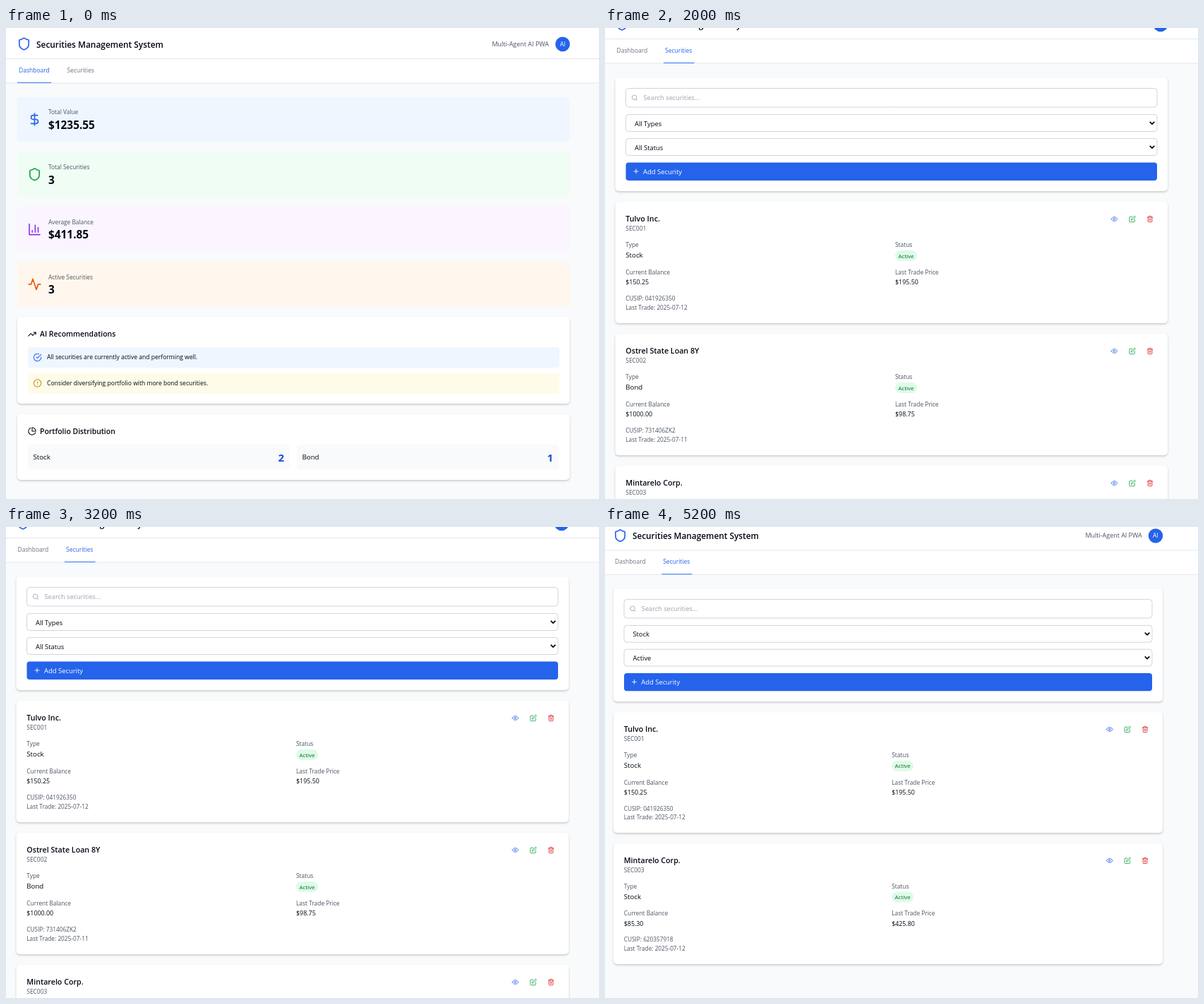
Recreate the animation shown at these times as an HTML page with a canvas. Size 840 by 667 pixels, loop 6000 ms.

```html
<!DOCTYPE html>
<html lang="en">
<head>
<meta charset="utf-8">
<title>Securities Management System</title>
<style>
  html, body { margin: 0; width: 100%; height: 100%; overflow: hidden; background: #f9fafb; }
  canvas { display: block; width: 840px; height: 667px; }
</style>
</head>
<body>
<canvas id="stage"></canvas>
<script>
const W = 840, H = 667, SCENE_MS = 2000;
const canvas = document.getElementById('stage');
const ctx = canvas.getContext('2d');
const dpr = window.devicePixelRatio || 1;
canvas.width = W * dpr;
canvas.height = H * dpr;

const INK = '#030712', GRAY = '#4b5563', MUTED = '#6b7280';
const BLUE = '#2563eb', GREEN = '#16a34a', RED = '#dc2626', LINE = '#d1d5db';

// Icon outlines on a 24 x 24 grid.
const circlePath = (x, y, r) => `M${x - r} ${y}a${r} ${r} 0 1 0 ${2 * r} 0a${r} ${r} 0 1 0 ${-2 * r} 0`;
const ICONS = {
  shield: 'M20 13c0 5-3.5 7.5-7.66 8.95a1 1 0 0 1-.67-.01C7.5 20.5 4 18 4 13V6a1 1 0 0 1 1-1c2 0 4.5-1.2 6.24-2.72a1.17 1.17 0 0 1 1.52 0C14.5 3.8 17 5 19 5a1 1 0 0 1 1 1z',
  dollar: 'M12 2v20M17 5H9.5a3.5 3.5 0 0 0 0 7h5a3.5 3.5 0 0 1 0 7H6',
  bars: 'M3 3v18h18M18 17V9M13 17V5M8 17v-3',
  pulse: 'M22 12h-4l-3 9L9 3l-3 9H2',
  trend: 'M22 7L13.5 15.5 8.5 10.5 2 17M16 7h6v6',
  check: 'M22 11.1V12a10 10 0 1 1-5.9-9.1M22 4L12 14 9 11',
  alert: circlePath(12, 12, 10) + 'M12 8v4M12 16h.01',
  pie: 'M21.2 15.9A10 10 0 1 1 8 2.8M22 12A10 10 0 0 0 12 2v10z',
  search: circlePath(11, 11, 8) + 'M21 21l-4.3-4.3',
  plus: 'M5 12h14M12 5v14',
  eye: 'M2 12s3-7 10-7 10 7 10 7-3 7-10 7-10-7-10-7z' + circlePath(12, 12, 3),
  edit: 'M11 4H4a2 2 0 0 0-2 2v14a2 2 0 0 0 2 2h14a2 2 0 0 0 2-2v-7M18.5 2.5a2.1 2.1 0 0 1 3 3L12 15l-4 1 1-4z',
  trash: 'M3 6h18M19 6v14a2 2 0 0 1-2 2H7a2 2 0 0 1-2-2V6M8 6V4a2 2 0 0 1 2-2h4a2 2 0 0 1 2 2v2M10 11v6M14 11v6'
};
for (const name in ICONS) ICONS[name] = new Path2D(ICONS[name]);

const SECURITIES = [
  { name: 'Tulvo Inc.', id: 'SEC001', type: 'Stock', balance: '$150.25', price: '$195.50', cusip: '041926350', date: '2025-07-12' },
  { name: 'Ostrel State Loan 8Y', id: 'SEC002', type: 'Bond', balance: '$1000.00', price: '$98.75', cusip: '731406ZK2', date: '2025-07-11' },
  { name: 'Mintarelo Corp.', id: 'SEC003', type: 'Stock', balance: '$85.30', price: '$425.80', cusip: '620357918', date: '2025-07-12' }
];

// y is the middle of the capital letters.
function text(str, x, y, size, color, weight = 400, align = 'left') {
  ctx.font = `${weight} ${size}px "Open Sans", "Noto Sans", sans-serif`;
  ctx.fillStyle = color;
  ctx.textAlign = align;
  ctx.fillText(str, x, y + size * 0.357);
}

function icon(name, cx, cy, size, color) {
  ctx.save();
  ctx.translate(cx - size / 2, cy - size / 2);
  ctx.scale(size / 24, size / 24);
  ctx.lineWidth = 2;
  ctx.lineCap = ctx.lineJoin = 'round';
  ctx.strokeStyle = color;
  ctx.stroke(ICONS[name]);
  ctx.restore();
}

function box(x, y, w, h, fill, radius = 4, stroke) {
  ctx.beginPath();
  ctx.roundRect(x, y, w, h, radius);
  ctx.fillStyle = fill;
  ctx.fill();
  if (!stroke) return;
  ctx.strokeStyle = stroke;
  ctx.lineWidth = 1;
  ctx.stroke();
}

function panel(y, h) {
  ctx.save();
  ctx.shadowColor = 'rgba(0,0,0,0.2)';
  ctx.shadowBlur = 3 * dpr;
  ctx.shadowOffsetY = 1.5 * dpr;
  box(16, y, 782.5, h, '#fff', 5);
  ctx.restore();
}

function rect(x, y, w, h, color) {
  ctx.fillStyle = color;
  ctx.fillRect(x, y, w, h);
}

function drawHeader(onDashboard) {
  rect(-10, -10, 900, 88, '#fff');
  rect(-10, 43, 900, 1, '#e5e7eb');
  rect(-10, 77.5, 900, 1, '#e5e7eb');
  icon('shield', 25.5, 22.5, 20, BLUE);
  text('Securities Management System', 43, 23.3, 11.9, INK, 600);
  text('Multi-Agent AI PWA', 769, 22.5, 9, GRAY, 400, 'right');
  box(778.2, 12.6, 20.6, 20.6, BLUE, 10.3);
  text('AI', 788.5, 22.7, 8.5, '#fff', 500, 'center');
  text('Dashboard', 18, 60, 8.5, onDashboard ? BLUE : MUTED);
  text('Securities', 86.5, 60, 8.5, onDashboard ? MUTED : BLUE);
  if (onDashboard) rect(16, 76.9, 48, 1.1, '#3b82f6');
  else rect(84.5, 76.9, 43.5, 1.1, '#3b82f6');
}

function drawDashboard() {
  const stats = [
    ['Total Value', '$1235.55', 'dollar', BLUE, '#eff6ff'],
    ['Total Securities', '3', 'shield', GREEN, '#f0fdf4'],
    ['Average Balance', '$411.85', 'bars', '#9333ea', '#faf5ff'],
    ['Active Securities', '3', 'pulse', '#ea580c', '#fff7ed']
  ];
  stats.forEach(([label, value, symbol, color, fill], i) => {
    const y = 98 + i * 77.8;
    box(16, y, 782.5, 63, fill);
    icon(symbol, 40.5, y + 31.5, 20, color);
    text(label, 60, y + 21.3, 8.35, GRAY);
    text(value, 60, y + 39.3, 15.4, INK, 700);
  });

  panel(409, 123);
  icon('trend', 37, 433.5, 12.5, INK);
  text('AI Recommendations', 48, 433.5, 10.45, INK, 600);
  box(31, 452, 753, 29, '#eff6ff');
  icon('check', 44.5, 466.5, 12.5, BLUE);
  text('All securities are currently active and performing well.', 58, 465.5, 8.55, INK);
  box(31, 488.5, 753, 29, '#fefce8');
  icon('alert', 44.5, 503, 12.5, '#ca8a04');
  text('Consider diversifying portfolio with more bond securities.', 58, 502.5, 8.55, INK);

  panel(547, 93);
  icon('pie', 37, 571, 12.5, INK);
  text('Portfolio Distribution', 48, 571.3, 10.45, INK, 600);
  [['Stock', 31, '2'], ['Bond', 412, '1']].forEach(([type, x, count]) => {
    box(x, 590, 371, 35, '#f9fafb');
    text(type, x + 7.5, 608, 9.7, INK, 500);
    text(count, x + 363, 609, 15, '#1d4ed8', 700, 'right');
  });
}

function drawSelect(label, y) {
  box(31, y, 752.5, 24, '#fff', 4, LINE);
  text(label, 43.5, y + 12.7, 9.4, INK);
  ctx.beginPath();
  ctx.moveTo(773.2, y + 10.3);
  ctx.lineTo(776.5, y + 13.5);
  ctx.lineTo(779.8, y + 10.3);
  ctx.strokeStyle = '#000';
  ctx.lineWidth = 1.7;
  ctx.stroke();
}

function drawSecurity(item, y) {
  const left = 30.8, right = 412.5;
  panel(y, 172);
  text(item.name, left, y + 24, 10.7, INK, 600);
  text(item.id, left, y + 38.5, 8.4, GRAY);
  icon('eye', 723, y + 24.5, 10, BLUE);
  icon('edit', 748.5, y + 24.5, 10, GREEN);
  icon('trash', 773.5, y + 24.5, 10, RED);
  text('Type', left, y + 61, 8.4, GRAY);
  text(item.type, left, y + 76, 9.7, INK, 500);
  text('Status', right, y + 61, 8.4, GRAY);
  box(right, y + 69, 31, 15, '#dcfce7', 7.5);
  text('Active', right + 15.5, y + 76.7, 8, '#166534', 500, 'center');
  text('Current Balance', left, y + 100, 8.4, GRAY);
  text(item.balance, left, y + 114.3, 8.9, INK, 500);
  text('Last Trade Price', right, y + 100, 8.4, GRAY);
  text(item.price, right, y + 114.3, 8.9, INK, 500);
  text('CUSIP: ' + item.cusip, left, y + 137.3, 8.3, GRAY);
  text('Last Trade: ' + item.date, left, y + 149.8, 8.3, GRAY);
}

function drawSecurities(type, status, items) {
  panel(98, 161);
  box(31, 113.5, 752.5, 26.5, '#fff', 4, LINE);
  icon('search', 43.5, 126.8, 10, '#9ca3af');
  text('Search securities...', 56, 127, 9.25, '#9ca3af');
  drawSelect(type, 150.5);
  drawSelect(status, 184.5);
  box(31, 218.5, 752.5, 25.5, BLUE);
  icon('plus', 45.5, 231, 10.5, '#fff');
  text('Add Security', 55.5, 231.6, 9.45, '#fff');
  items.forEach((item, i) => drawSecurity(item, 274 + i * 187));
}

const SCENES = [
  { zoom: 1, x: 0, y: 0, body: drawDashboard },
  { zoom: 1, x: -1.5, y: -28, body: () => drawSecurities('All Types', 'All Status', SECURITIES) },
  { zoom: 0.994, x: -3.8, y: -10.2,
    body: () => drawSecurities('Stock', 'Active', SECURITIES.filter(s => s.type === 'Stock')) }
];

const start = performance.now();
function render() {
  const elapsed = performance.now() - start;
  const index = Math.floor(elapsed / SCENE_MS) % SCENES.length;
  const { zoom, x, y, body } = SCENES[index];
  ctx.setTransform(dpr, 0, 0, dpr, 0, 0);
  rect(0, 0, W, H, '#f9fafb');
  ctx.translate(x, y);
  ctx.scale(zoom, zoom);
  drawHeader(index === 0);
  body();
  requestAnimationFrame(render);
}
render();
</script>
</body>
</html>
```
